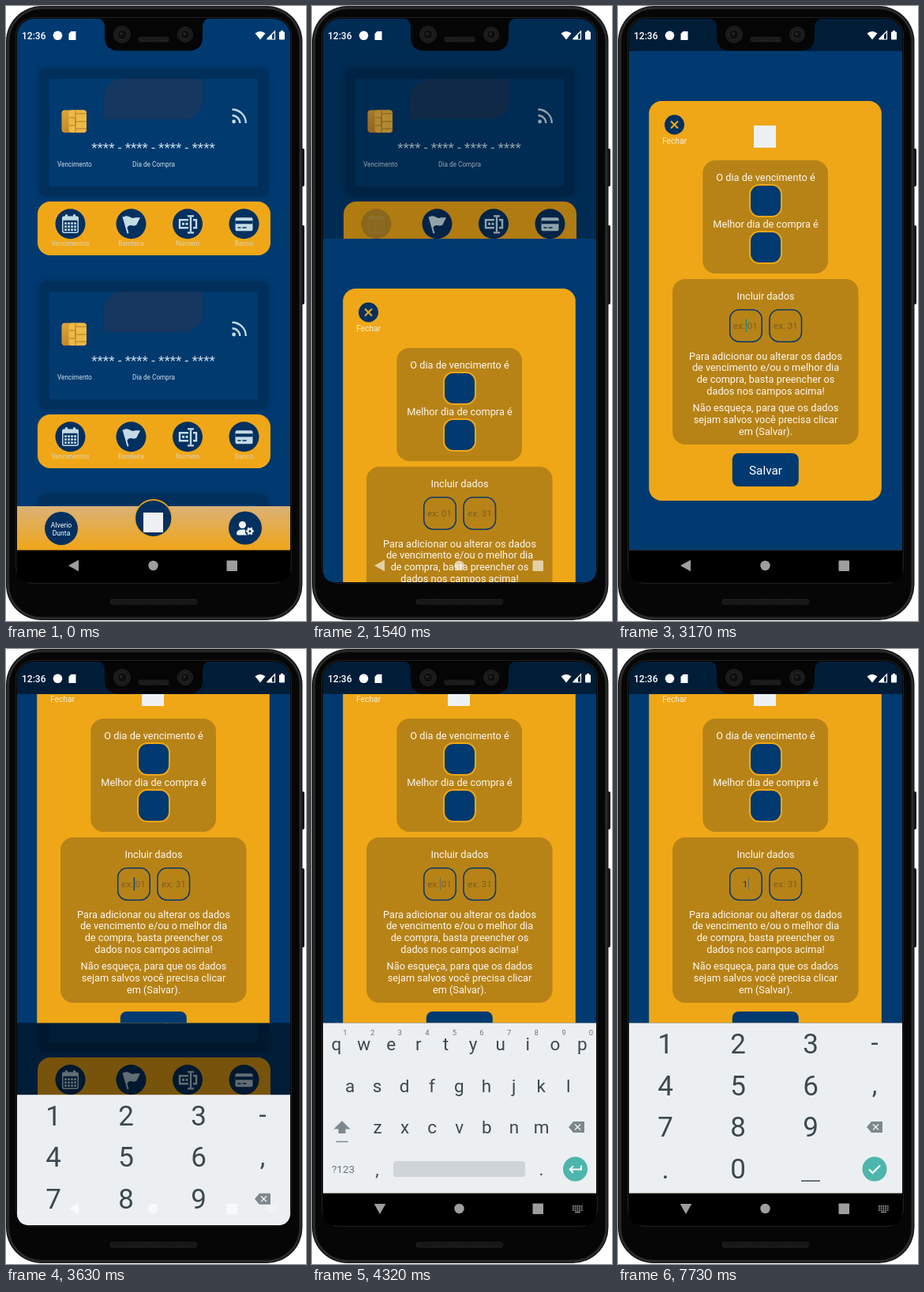
Recreate the animation shown at these times as an HTML page with a canvas. Size 380 px wide and 777 px high, loop 7.99 s.

```html
<!DOCTYPE html>
<html lang="pt">
<head>
<meta charset="utf-8">
<title>Cartões</title>
<style>
html, body { margin: 0; width: 100%; height: 100%; overflow: hidden; background: #fff; }
canvas { display: block; width: 380px; height: 777px; }
</style>
</head>
<body>
<canvas id="stage"></canvas>
<script>
const cv = document.getElementById('stage');
const c = cv.getContext('2d');
const dpr = window.devicePixelRatio || 1;
cv.width = 380 * dpr;
cv.height = 777 * dpr;

const LOOP = 7990;
const BLUE = '#003a70', NAVY = '#03305f', GOLD = '#efa717', DARKGOLD = '#b78317';
const PALE = '#c3dbe6', INK = '#3c494f', GREY = '#7c888d', TEAL = '#4db6ac';
const FONT = 'Roboto, "Noto Sans", sans-serif';

const clamp = v => Math.max(0, Math.min(1, v));
const prog = (t, a, b) => clamp((t - a) / (b - a));

// motion advances in 70 ms steps inside these spans
const SPANS = [[1470, 1960], [3630, 3840], [4040, 4320]];
function hold(t) {
  for (const [a, b] of SPANS) if (t >= a && t <= b) return a + Math.floor((t - a) / 70) * 70;
  return t;
}

function box(x, y, w, h, r, fill, stroke, lw = 1) {
  c.beginPath();
  c.roundRect(x, y, w, h, r);
  if (fill) { c.fillStyle = fill; c.fill(); }
  if (stroke) { c.strokeStyle = stroke; c.lineWidth = lw; c.stroke(); }
}
function dot(x, y, r, fill, stroke, lw = 1) {
  c.beginPath();
  c.arc(x, y, r, 0, Math.PI * 2);
  if (fill) { c.fillStyle = fill; c.fill(); }
  if (stroke) { c.strokeStyle = stroke; c.lineWidth = lw; c.stroke(); }
}
function poly(fill, ...p) {
  c.beginPath();
  for (let i = 0; i < p.length; i += 2) c.lineTo(p[i], p[i + 1]);
  c.closePath();
  c.fillStyle = fill;
  c.fill();
}
function line(color, lw, ...p) {
  c.beginPath();
  for (let i = 0; i < p.length; i += 2) c.lineTo(p[i], p[i + 1]);
  c.strokeStyle = color;
  c.lineWidth = lw;
  c.stroke();
}
function text(s, x, y, size, color = '#fff', align = 'center', weight = 400) {
  c.font = `${weight} ${size}px ${FONT}`;
  c.textAlign = align;
  c.fillStyle = color;
  c.fillText(s, x, y);
}
function group(dx, dy, draw) {
  c.save();
  c.translate(dx, dy);
  draw();
  c.restore();
}
function clipTo(x, y, w, h, draw) {
  c.save();
  c.beginPath();
  c.rect(x, y, w, h);
  c.clip();
  draw();
  c.restore();
}

// ---- icons, drawn around 0,0
function calendar() {
  box(-9.7, -9, 19.4, 20, 2, null, PALE, 1.5);
  c.fillStyle = PALE;
  c.fillRect(-10, -9, 20, 4.5);
  box(-6.5, -12, 3, 5, 1, PALE);
  box(3.5, -12, 3, 5, 1, PALE);
  c.fillStyle = PALE;
  for (let i = 0; i < 4; i++)
    for (let j = 0; j < 3; j++) c.fillRect(-7.3 + i * 4, -2 + j * 4, 2.7, 2.7);
}
function flag() {
  line(PALE, 2, -10, -9, -4, 12);
  c.beginPath();
  c.moveTo(-10, -8);
  c.bezierCurveTo(-4, -14, -1, -5, 5, -8);
  c.lineTo(11.5, -8);
  c.lineTo(7, 1);
  c.bezierCurveTo(2, 5, -1, -2, -5.5, 5);
  c.closePath();
  c.fillStyle = PALE;
  c.fill();
}
function field() {
  line(PALE, 2.4, 1, -5, -10, -5, -10, 5, 1, 5);
  line(PALE, 2.4, 7, -5, 11, -5, 11, 5, 7, 5);
  line(PALE, 2.4, 4, -9, 4, 10);
  line(PALE, 2.2, 0, -10, 8, -10);
  line(PALE, 2.2, 0, 11, 8, 11);
  c.fillStyle = PALE;
  c.fillRect(-7, -1.5, 3, 3);
  c.fillRect(-2.5, -1.5, 3, 3);
}
function bankCard() {
  box(-11, -8, 22, 17, 2, PALE);
  c.fillStyle = NAVY;
  c.fillRect(-11, -4, 22, 4);
  c.fillRect(-8, 4, 4, 1.5);
  c.fillRect(-2, 4, 5, 1.5);
}
function userGear() {
  const w = '#f2f5f8';
  dot(-3.5, -4, 4.5, w);
  box(-11, 2, 14, 7, [6, 2, 1, 2], w);
  dot(6, 4, 6.2, NAVY);
  for (let i = 0; i < 6; i++) {
    const a = i * Math.PI / 3;
    line(w, 2.2, 6, 4, 6 + 5 * Math.cos(a), 4 + 5 * Math.sin(a));
  }
  dot(6, 4, 3.7, w);
  dot(6, 4, 1.5, NAVY);
}
function backspace() {
  poly(GREY, -10, 0, -4, -7, 10, -7, 10, 7, -4, 7);
  line('#eceff2', 1.5, -2, -3.5, 5, 3.5);
  line('#eceff2', 1.5, -2, 3.5, 5, -3.5);
}

// ---- card list
const ACTIONS = [
  [81.5, 'Vencimentos', calendar], [158.5, 'Bandeira', flag],
  [230, 'Número', field], [301.5, 'Banco', bankCard]
];
function chip() {
  const gold = c.createLinearGradient(70, 131, 84, 160);
  gold.addColorStop(0, '#e0a73c');
  gold.addColorStop(1, '#c28426');
  box(70.5, 131.5, 31.5, 28.5, 4, gold);
  box(79.5, 131.5, 22.5, 28.5, 4, '#efb945');
  const seam = '#b27f28';
  line(seam, 1, 80, 141, 88, 141, 88, 151, 80, 151);
  line(seam, 1, 88, 136, 102, 136);
  line(seam, 1, 88, 146, 102, 146);
  line(seam, 1, 88, 155, 102, 155);
  line(seam, 1, 88, 132, 88, 160);
}
function card(pressed) {
  c.save();
  c.shadowColor = '#002e59';
  c.shadowBlur = 7 * dpr;
  box(42, 79, 290, 161, 9, '#002f5b');
  c.restore();
  box(54.5, 92, 264.5, 136, 2, '#003a6f');
  box(124, 92, 125, 51, [24, 0, 24, 0], '#16375f');
  chip();

  dot(288.6, 146, 2.4, PALE);
  for (const r of [9.8, 17.3]) {
    c.beginPath();
    c.arc(286.5, 148, r, -Math.PI / 2, 0);
    c.strokeStyle = PALE;
    c.lineWidth = 2.4;
    c.stroke();
  }
  text('**** - **** - **** - ****', 186.5, 185, 17, '#c8dbe6');
  text('Vencimento', 65, 202.5, 8.25, '#cfdee8', 'left');
  text('Dia de Compra', 160, 202.5, 8.25, '#cfdee8', 'left');

  box(40, 247, 295, 68, 16, GOLD);
  ACTIONS.forEach(([x, label, icon], i) => {
    const fade = pressed && i === 0;
    c.save();
    if (fade) c.globalAlpha = 0.22;
    dot(x, 275.3, 19, NAVY);
    text(label, x, 303, 8.35, '#d8d3bd');
    if (fade) c.globalAlpha = 0.07;
    group(x, 275.3, icon);
    c.restore();
  });
}
function page(pressed) {
  c.fillStyle = BLUE;
  c.fillRect(14, 16, 346, 672);
  for (let i = 0; i < 3; i++) group(0, 269 * i, () => card(pressed && i === 0));
  const g = c.createLinearGradient(0, 632, 0, 687);
  g.addColorStop(0, '#dab277');
  g.addColorStop(1, '#f0a518');
  c.fillStyle = g;
  c.fillRect(14, 632, 346, 56);
  dot(70, 660, 21, NAVY);
  text('Alverio', 70, 658.5, 8.6);
  text('Dunta', 70, 668.5, 8.6);
  dot(186.7, 647.3, 23.4, NAVY, GOLD, 1.6);
  box(174, 640, 25, 25, 0, '#eef1f4');
  dot(303, 659.5, 21, NAVY);
  group(303, 659.5, userGear);
  c.fillStyle = '#000';
  c.fillRect(14, 687.5, 346, 41);
}

// ---- due date dialog
const NOTE = [
  [446.5, 'Para adicionar ou alterar os dados'], [461.3, 'de vencimento e/ou o melhor dia'],
  [476.2, 'de compra, basta preencher os'], [491, 'dados nos campos acima!'],
  [512.3, 'Não esqueça, para que os dados'], [527.2, 'sejam salvos você precisa clicar'],
  [542, 'em (Salvar).']
];
function dialog(t) {
  const w = '#fbf7ee', hint = '#7c5d20', size = 12.75;
  box(39.2, 120, 294.6, 505, 16, GOLD);
  dot(71.5, 150, 12.5, NAVY);
  line(GOLD, 2.2, 67, 145.5, 76, 154.5);
  line(GOLD, 2.2, 67, 154.5, 76, 145.5);
  text('Fechar', 71.5, 173.7, 10.2, '#f8ecd4');

  c.save();
  c.globalAlpha = prog(t, 1610, 1960);
  box(172, 151, 28, 28, 0, '#eef1f4');
  c.restore();

  box(107.3, 195, 158.7, 143, 16, DARKGOLD);
  text('O dia de vencimento é', 187, 221, size, w);
  text('Melhor dia de compra é', 187, 280, size, w);
  for (const y of [226, 285]) box(167, y, 40, 40, 12, BLUE, GOLD, 2);

  box(69, 345, 235.5, 209, 16, DARKGOLD);
  text('Incluir dados', 187, 371, size, w);
  for (const x of [141.7, 192]) box(x, 383.7, 40.5, 40.5, 12, null, '#0b3a68', 1.6);
  const typed = t >= 7730;
  if (typed) text('1', 161, 408.3, 11.7, '#2e2a1c');
  else text('ex: 01', 161.5, 408.3, 11.7, hint);
  text('ex: 31', 212.5, 408.3, 11.7, hint);
  if (t >= 3170) {
    const color = t < 3630 ? '#0e8f90' : t < 4040 ? '#0d4c80' : '#5b6b62';
    const x = typed ? 165.5 : 162.4;
    line(color, t < 4040 ? 1.6 : 1, x, 395.5, x, 412);
  }
  for (const [y, s] of NOTE) text(s, 187, y, size, w);
  box(144.8, 565, 84, 42, 8, BLUE);
  text('Salvar', 187, 592, 15.3);
}

// ---- keyboards
function numberKeys() {
  const cols = [60, 152, 244];
  for (let n = 1; n < 10; n++)
    text(n, cols[(n - 1) % 3], 511 + Math.floor((n - 1) / 3) * 52.7, 35, INK);
  text('0', 152, 669, 35, INK);
  text('.', 60, 669, 35, INK);
  line(INK, 1.6, 232, 672, 256, 672);
  text('-', 325, 509, 33, INK);
  text(',', 325, 562, 33, INK);
  group(325, 604, backspace);
  dot(325, 657, 15.5, TEAL);
  line('#fff', 2, 318, 657.5, 322.5, 662, 332, 652.5);
}
function letterKeys() {
  const row = (s, x, y) => [...s].forEach((k, i) => text(k, x + i * 34.6, y, 22.5, INK));
  row('qwertyuiop', 31, 506.5);
  row('asdfghjkl', 48, 559.5);
  row('zxcvbnm', 83, 612.3);
  [...'1234567890'].forEach((k, i) => text(k, 42 + i * 34.6, 487.5, 9.5, '#6b777c'));
  poly(GREY, 38, 596, 48.5, 606.5, 42.5, 606.5, 42.5, 612, 33.5, 612, 33.5, 606.5, 27.5, 606.5);
  line(GREY, 1.4, 30.5, 622.5, 45.5, 622.5);
  group(335, 604, backspace);
  text('?123', 39.5, 662, 13.5, '#6b777c');
  text(',', 82.5, 665, 22.5, INK);
  box(103, 647, 167, 20, 4, '#cfd4d8');
  text('.', 290.5, 665, 22.5, INK);
  dot(333.5, 657, 15.5, TEAL);
  line('#fff', 1.9, 341, 652.5, 341, 657.5, 327, 657.5);
  line('#fff', 1.9, 331, 653.2, 326.7, 657.5, 331, 661.8);
}
function keyboard(t) {
  const off = 215 * Math.pow(1 - prog(t, 3560, 3840), 3);
  group(0, off, () => {
    c.fillStyle = '#eceff2';
    c.fillRect(14, 472.5, 346, 215);
    (t >= 4040 && t < 7330 ? letterKeys : numberKeys)();
  });
}

// ---- system bars
function statusBar() {
  text('12:36', 20, 41.7, 12, '#fff', 'left', 500);
  dot(65.5, 37.3, 5.8, '#fff');
  poly('#fff', 82.5, 32, 88.5, 32, 88.5, 43, 79.5, 43, 79.5, 35);
  c.beginPath();
  c.moveTo(322, 42.5);
  c.lineTo(315.5, 34.5);
  c.quadraticCurveTo(322, 29.5, 328.5, 34.5);
  c.closePath();
  c.fillStyle = '#fff';
  c.fill();
  line('#fff', 1.2, 330.5, 42, 340.5, 42, 340.5, 32, 330.5, 42);
  poly('#fff', 330.5, 42, 337, 42, 337, 35.5);
  box(346, 32.5, 7, 10, 1, '#fff');
  c.fillRect(348, 31, 3, 2);
}
function navIcons(t) {
  const w = 'rgba(255,255,255,.62)';
  const turn = t >= 4040 ? prog(t, 3970, 4320) : 0;
  c.save();
  c.translate(86, 707);
  c.rotate(-Math.PI / 2 * turn);
  poly(w, -7, 0, 6, -7.3, 6, 7.3);
  c.restore();
  dot(186.5, 707, 6.2, w);
  box(279.5, 700.5, 13.5, 13.5, 1, w);
  if (t >= 3430) {
    c.fillStyle = w;
    for (let j = 0; j < 3; j++)
      for (let i = 0; i < 5; i++) c.fillRect(330 + i * 2.7, 703 + j * 2.6, 1.8, 1.6);
    c.fillRect(333, 710.8, 7, 1.3);
  }
}

// ---- device
function body() {
  box(372, 180, 6, 48, 2, '#141414');
  box(372, 277, 6, 100, 2, '#141414');
  box(0, 0, 375.5, 776, 45, '#1a1a1a');
  box(2.5, 2.5, 370.5, 771, 43, null, '#303030', 1.6);
  box(4.5, 4.5, 366.5, 767, 40, '#060606');
  box(12.5, 14.5, 349, 715, 23, null, '#1e1e1e', 1.2);
  box(131.5, 749, 111, 7.5, 3.7, '#1c1c1c');
  for (let x = 135; x < 241; x += 3) {
    dot(x, 751.5, 0.7, '#080808');
    dot(x + 1.5, 754, 0.7, '#080808');
  }
}
function notch() {
  c.beginPath();
  c.moveTo(114, 15);
  c.quadraticCurveTo(125, 16, 125, 27);
  c.lineTo(125, 39);
  c.quadraticCurveTo(125, 56.5, 143, 56.5);
  c.lineTo(231, 56.5);
  c.quadraticCurveTo(249, 56.5, 249, 39);
  c.lineTo(249, 27);
  c.quadraticCurveTo(249, 16, 260, 15);
  c.closePath();
  c.fillStyle = '#050505';
  c.fill();
  for (const [x, r] of [[147, 10.5], [227, 9.5]]) {
    dot(x, 36, r, '#191919', '#212122', 1);
    dot(x, 36, r * 0.6, '#0f0f10', '#2a2a2b', 1);
    dot(x - 1, 35, 1.5, '#2e2e31');
  }
  box(167, 38.5, 40, 7.5, 3.5, '#161616');
  for (let x = 170; x < 206; x += 3) {
    dot(x, 41, 0.8, '#333');
    dot(x + 1.5, 43.8, 0.8, '#333');
  }
}

function draw(now) {
  const t = hold(now);
  const open = t >= 1470, typing = t >= 3630;
  c.setTransform(dpr, 0, 0, dpr, 0, 0);
  c.fillStyle = '#fff';
  c.fillRect(0, 0, 380, 777);
  body();

  c.save();
  c.beginPath();
  c.roundRect(14, 16, 346, 712, [22, 22, 14, 14]);
  c.clip();
  page(t >= 880 && !typing);
  if (open) {
    const p = prog(t, 1430, 1680);
    c.fillStyle = `rgba(0,0,0,${0.5 * Math.min(1, p * 1.2)})`;
    c.fillRect(14, 16, 346, 712);
    const off = Math.round(671 * Math.pow(1 - p, 1.795));
    const top = 57 + off;
    const bottom = typing ? 472.5 : Math.min(728, 687.5 + off);
    clipTo(14, top, 346, bottom - top, () => {
      c.fillStyle = BLUE;
      c.fillRect(14, top, 346, bottom - top);
      group(0, typing ? -107 : off, () => dialog(t));
    });
  }
  if (typing) keyboard(t);
  navIcons(t);
  statusBar();
  c.restore();
  notch();
}

const start = performance.now();
function frame() {
  draw((performance.now() - start) % LOOP);
  requestAnimationFrame(frame);
}
frame();
</script>
</body>
</html>
```
